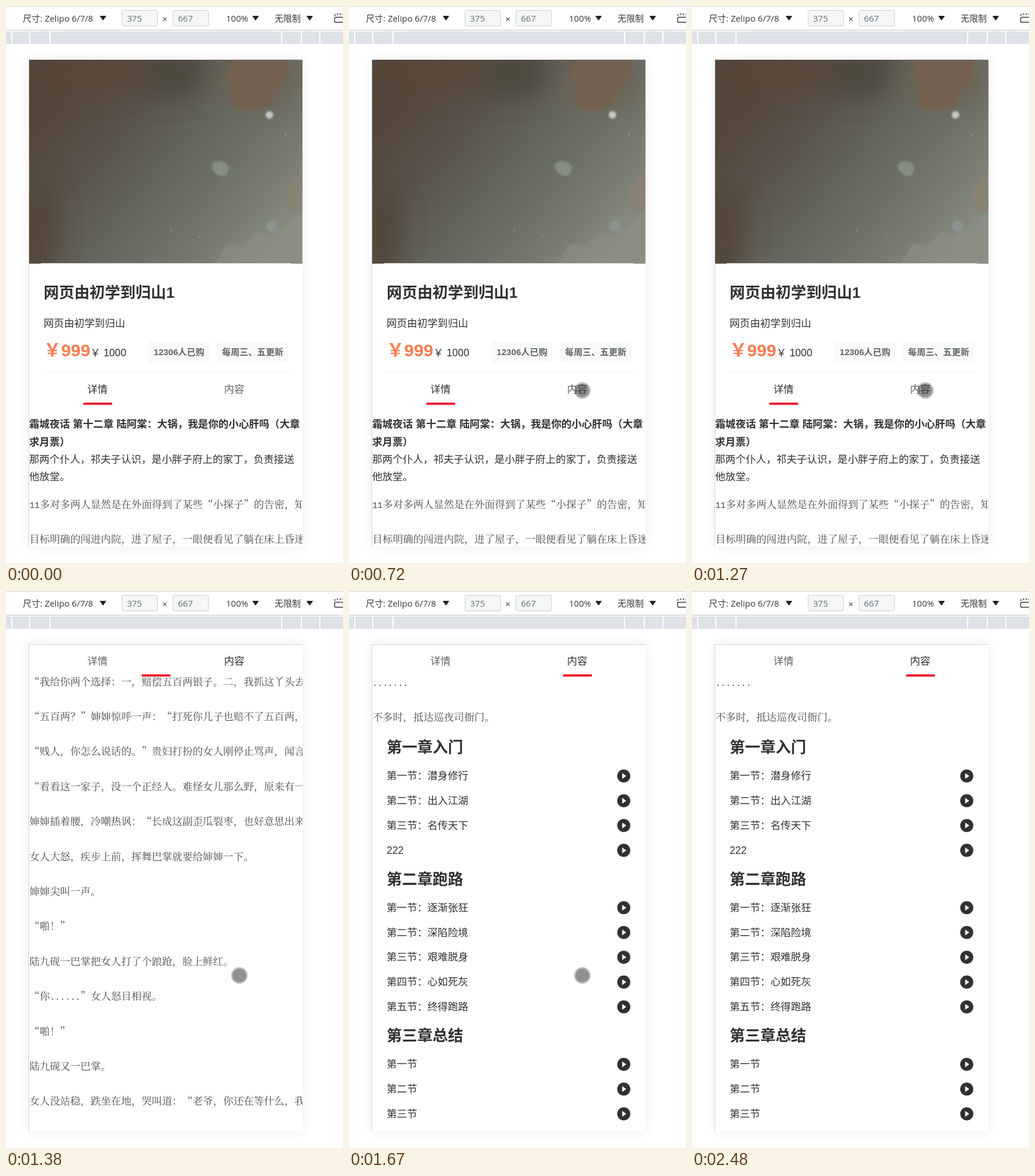
These frames come from a looping animation (582x962 px, 3.58 s). An HTML page:

```html
<!DOCTYPE html>
<html lang="zh-CN">
<head>
<meta charset="utf-8">
<style>
html, body { margin: 0; width: 100%; height: 100%; overflow: hidden; background: #fff; }
svg { display: block; }
text { font: 17.63px "Liberation Sans", "Noto Sans CJK SC", "Noto Sans CJK", sans-serif; fill: #303133;
  text-spacing-trim: space-all; font-kerning: none; }
.bar { font: 15px "Open Sans", "Noto Sans CJK SC", "Noto Sans CJK", sans-serif; fill: #333639; }
.bar.dim { fill: #6b6f73; }
.head { font-size: 26.45px; font-weight: bold; }
.bold { font-weight: bold; }
.price { font-size: 30.2px; font-weight: bold; fill: #fa7b50; }
.tag { font-size: 15.15px; font-weight: bold; fill: #606660; }
.prose { font-family: "Noto Serif CJK SC", "Noto Sans CJK SC", "Noto Sans CJK", serif; font-weight: 300; fill: #484848; }
.prose tspan { font: 14.69px "Liberation Mono", monospace; }
</style>
</head>
<body>
<svg width="582" height="962" viewBox="0 0 582 962">
  <defs>
    <clipPath id="screen"><rect x="40" y="93" width="472" height="839.5"/></clipPath>
    <clipPath id="photo"><rect x="40" y="93" width="472" height="352"/></clipPath>
    <linearGradient id="base" gradientUnits="userSpaceOnUse" x1="110" y1="130" x2="470" y2="430">
      <stop offset="0" stop-color="#54463b"/><stop offset=".25" stop-color="#59534a"/>
      <stop offset=".5" stop-color="#65675e"/><stop offset=".75" stop-color="#74786d"/>
      <stop offset="1" stop-color="#8a8d82"/>
    </linearGradient>
    <filter id="soft" x="-50%" y="-50%" width="200%" height="200%"><feGaussianBlur stdDeviation="22"/></filter>
    <filter id="edge" x="-50%" y="-50%" width="200%" height="200%"><feGaussianBlur stdDeviation="1.6"/></filter>
    <filter id="shade" x="-20%" y="-20%" width="140%" height="140%"><feGaussianBlur stdDeviation="12"/></filter>
  </defs>

  <rect width="582" height="1" fill="#c9ccd0"/>
  <rect y="41" width="582" height="1.5" fill="#cdd1d6"/>
  <rect y="44" width="582" height="21.5" fill="#dee1e6"/>
  <g id="ticks" fill="#fff"></g>
  <g fill="#f4f6f7" stroke="#cbcfd4">
    <rect x="200.5" y="7.5" width="61" height="27" rx="2"/>
    <rect x="288.5" y="7.5" width="61" height="27" rx="2"/>
  </g>
  <g id="bar"></g>
  <g fill="none" stroke="#333639" stroke-width="1.5">
    <rect x="567.5" y="19.5" width="17" height="8.5" rx="1.5"/>
    <path d="M568 17v-1.5q0-1.5 2-1.5h14" stroke-dasharray="3 2"/>
  </g>

  <rect x="40" y="93" width="472" height="840" fill="#000" opacity=".075" filter="url(#shade)"/>
  <rect x="39" y="92" width="473" height="841" fill="#d4d5d6"/>
  <rect x="40" y="93" width="472" height="840" fill="#fff"/>

  <g clip-path="url(#screen)">
    <g id="page">
      <g clip-path="url(#photo)">
        <rect x="40" y="93" width="472" height="352" fill="url(#base)"/>
        <g filter="url(#soft)">
          <ellipse cx="285" cy="115" rx="60" ry="45" fill="#4d483d"/>
          <ellipse cx="50" cy="390" rx="40" ry="90" fill="#52463b"/>
          <ellipse cx="150" cy="110" rx="95" ry="40" fill="#58463b"/>
          <ellipse cx="435" cy="130" rx="75" ry="45" fill="#6c6354"/>
        </g>
        <g filter="url(#edge)">
          <path d="M386 93H484L486 118 462 150 455 172 420 180 390 174 394 140 383 124Z" fill="#75604f" opacity=".85"/>
          <path d="M512 288 492 300 482 322 486 346 512 362Z" fill="#8b8272" opacity=".7"/>
          <path d="M512 350 482 378 455 395 430 390 412 410 380 412 360 445H512Z" fill="#8d9085" opacity=".55"/>
          <path d="M355 274q8-9 20-5 12 4 9 15-3 12-15 9-13-5-14-19Z" fill="#868c80"/>
          <circle cx="459" cy="380" r="10" fill="#8d938f"/>
          <circle cx="455" cy="188" r="6.5" fill="#c4c5c3"/>
        </g>
        <g fill="#90938a">
          <circle cx="483" cy="222" r="2"/><circle cx="285" cy="387" r="1.5"/><circle cx="334" cy="399" r="1.5"/>
        </g>
      </g>
      <rect x="60" y="444" width="432" height="1" fill="#d2d3d0"/>
      <g fill="#f8f9fa">
        <rect x="246" y="579.5" width="105.5" height="36.5" rx="4"/>
        <rect x="364" y="579.5" width="123" height="36.5" rx="4"/>
      </g>
    </g>
    <g id="nav">
      <rect x="40" y="634" width="472" height="55" fill="#fff"/>
      <rect x="60" y="632.5" width="432" height="1" fill="#f3f4f5"/>
      <rect id="line" y="685" width="50.4" height="3.8" rx="1.9" fill="#ee0a24"/>
    </g>
  </g>
  <g id="dot">
    <circle r="11.8" fill-opacity=".43"/>
    <circle r="13" fill="none" stroke="#000" stroke-opacity=".25" stroke-width="2.6"/>
  </g>
</svg>
<script>
const $ = id => document.getElementById(id);
const page = $('page'), nav = $('nav'), bar = $('bar');

function add(parent, tag, attrs) {
  const el = document.createElementNS('http://www.w3.org/2000/svg', tag);
  for (const k in attrs) el.setAttribute(k, attrs[k]);
  return parent.appendChild(el);
}

function write(parent, x, y, str, cls = '') {
  const el = add(parent, 'text', { x, y, class: cls });
  el.textContent = str;
  return el;
}

// Toolbar
for (const x of [9, 40, 75, 475, 509, 541]) add($('ticks'), 'rect', { x, y: 44, width: 2, height: 21.5 });
write(bar, 29, 27, '尺寸: Zelipo 6/7/8', 'bar');
write(bar, 209, 27, '375', 'bar dim');
write(bar, 270, 28, '×', 'bar');
write(bar, 297, 27, '667', 'bar dim');
write(bar, 380, 27, '100%', 'bar');
write(bar, 464, 27, '无限制', 'bar');
for (const x of [167.5, 431, 524.5])
  add(bar, 'path', { d: `M${x - 5} 17.5h10l-5 7Z`, fill: '#222', stroke: '#222', 'stroke-linejoin': 'round' });

// Course card
write(page, 65, 504, '网页由初学到归山1', 'head');
write(page, 65, 553.7, '网页由初学到归山');
write(page, 65, 605, '￥999', 'price');
write(page, 145.5, 604.7, '￥');
write(page, 168.5, 604.7, '1000');
write(page, 255, 603, '12306人已购', 'tag');
write(page, 373, 603, '每周三、五更新', 'tag');
write(page, 40, 728, '霜城夜话 第十二章 陆阿棠：大锅，我是你的小心肝吗（大章', 'bold');
write(page, 40, 758.5, '求月票）', 'bold');
write(page, 40, 788.5, '那两个仆人，祁夫子认识，是小胖子府上的家丁，负责接送');
write(page, 40, 818.8, '他放堂。');

// Article
const PITCH = 60.4;
const prose = `11多对多两人显然是在外面得到了某些“小探子”的告密，知
目标明确的闯进内院，进了屋子，一眼便看见了躺在床上昏迷
“我给你两个选择：一，赔偿五百两银子。二，我抓这丫头去
“五百两？”婶婶惊呼一声：“打死你儿子也赔不了五百两，
“贱人，你怎么说话的。”贵妇打扮的女人刚停止骂声，闻言
“看看这一家子，没一个正经人。难怪女儿那么野，原来有一
婶婶插着腰，冷嘲热讽：“长成这副歪瓜裂枣，也好意思出来
女人大怒，疾步上前，挥舞巴掌就要给婶婶一下。
婶婶尖叫一声。
“啪！”
陆九砚一巴掌把女人打了个踉跄，脸上鲜红。
“你......”女人怒目相视。
“啪！”
陆九砚又一巴掌。
女人没站稳，跌坐在地，哭叫道：“老爷，你还在等什么，我
婶婶把话题扯开，懊恼道：“我刚就是心太软，没有应对好，
很多人事后都会暗自恼怒，刚才明明可以这样这样.......为什
陆阿棠看着大锅把自己吐出来的食物擦干净，惋惜道：“它们
“没事，你赚了。”陆九砚摸着她的头：“回头你可以再吃一
“真的吗？”
陆阿棠一听就很开心，心说大锅真聪明。
“真的。”陆九砚点点头。
不过你会先被你娘揍的半死。
“大锅，我是不是你的小心肝？”陆阿棠问。
陆九砚诧异的反问：“这话说的，比大哥的脑袋还秃然。”
小糯团回答：“昨晚我听见爹喊娘小心肝，但从来没有人喊我
“因为你不是小心肝。”
小糯团失望的说：“那我是什么呀。”等等的
.......
不多时，抵达巡夜司衙门。`;

prose.split('\n').forEach((row, i) => {
  const el = write(page, 40.5, 866.7 + i * PITCH, '', 'prose');
  for (const part of row.split(/([!-~]+)/)) {
    if (/^[!-~]/.test(part)) add(el, 'tspan', {}).textContent = part;
    else el.append(part);
  }
});

// Chapter list
const END = 2394;
const chapters = [
  [269, '第一章入门', ['第一节：潜身修行', '第二节：出入江湖', '第三节：名传天下', '222']],
  [496.5, '第二章跑路', ['第一节：逐渐张狂', '第二节：深陷险境', '第三节：艰难脱身', '第四节：心如死灰', '第五节：终得跑路']],
  [767, '第三章总结', ['第一节', '第二节', '第三节']]
];
for (const [top, title, items] of chapters) {
  write(page, 65, END + top + 10, title, 'head');
  items.forEach((item, i) => {
    const y = END + top + 50 + i * 42.8;
    write(page, 65, y + 6.2, item);
    add(page, 'circle', { cx: 474.5, cy: y + .5, r: 11.3, fill: '#303133' });
    add(page, 'path', { d: `M471.8 ${y - 4.5}l7 5-7 5Z`, fill: '#fff' });
  });
}

const tabs = [write(nav, 140.5, 667.9, '详情'), write(nav, 376.5, 667.9, '内容')];
nav.append($('line'));

// Steps: time, value(s)
const LOOP = 3580, STUCK = 541;
const scroll = [[0, 0, 133.2], [1380, 824.8, 234], [1470, 1590, 341], [1570, END - 70, 369], [1670, END, 369.5]];
const pointer = [
  [0], [100, 475, 940], [200, 456, 862], [310, 434, 775], [410, 417, 712], [510, 407, 680], [620, 404, 667],
  [720, 403, 664], [2180, 415, 684], [2280, 467, 778], [2380, 541, 930], [2480]
];
const at = (steps, t) => steps.findLast(s => s[0] <= t);

function draw(now) {
  const t = now % LOOP;
  const [, top, x] = at(scroll, t);
  const [, px, py] = at(pointer, t);
  page.setAttribute('transform', `translate(0 ${-top})`);
  nav.setAttribute('transform', `translate(0 ${-Math.min(top, STUCK)})`);
  $('line').setAttribute('x', x);
  tabs.forEach((tab, i) => tab.style.fill = (top > 0) === (i === 1) ? '#303133' : '#606266');
  $('dot').style.display = px ? '' : 'none';
  if (px) $('dot').setAttribute('transform', `translate(${px} ${py})`);
}

const start = performance.now();
function tick() {
  draw(performance.now() - start);
  requestAnimationFrame(tick);
}
tick();
</script>
</body>
</html>
```
